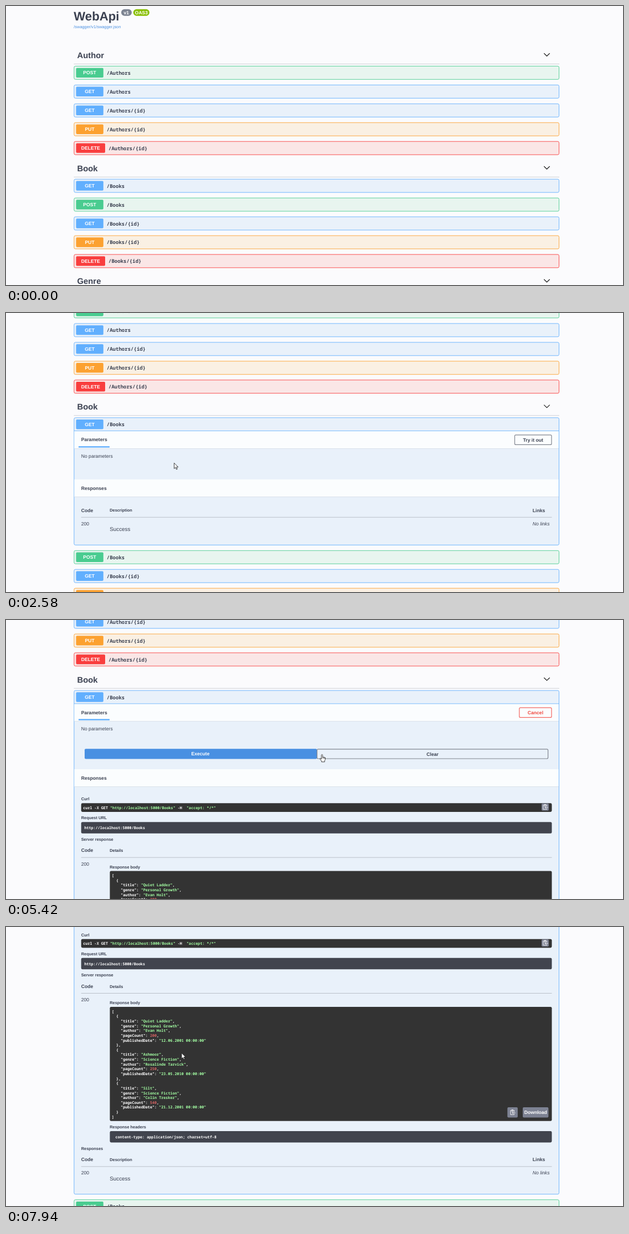
Animation of 1114 by 503 pixels, one loop 8 s. Source, as an HTML page:

```html
<!DOCTYPE html>
<html lang="en">
<head>
<meta charset="utf-8">
<title>WebApi</title>
<style>
  html, body { margin: 0; width: 100%; height: 100%; overflow: hidden; background: #fbfbfd; }
  svg { display: block; }
  text {
    font-family: "Liberation Sans", Arial, sans-serif;
    font-weight: 700; fill: #3b4151; white-space: pre; text-rendering: geometricPrecision;
  }
  .mono { font-family: "Noto Sans Mono", "DejaVu Sans Mono", monospace; }
  .plain { font-weight: 400; }
  .italic { font-weight: 400; font-style: italic; }
  .mid { text-anchor: middle; }
  .white { fill: #fff; }
  .str { fill: #a2fca2; }
  .num { fill: #d36363; }
</style>
</head>
<body>
<svg id="stage" width="1114" height="503" viewBox="0 0 1114 503"></svg>
<script>
const LOOP = 8000, PITCH = 33.95, ROW_H = 24.7, SECTION_H = 203.75, TICK = 61.7;
const LEFT = 122.9, RIGHT = 998.5, INNER = 135.7, INNER_R = 985.5;
const PANEL_Y = 3 * TICK;            // the panel is laid out as seen after three scroll ticks
const PANEL_TOP = 126.7;
const PANEL_BOTTOM = [PANEL_TOP + ROW_H, 357, 379.2, 790.6];
const TINTS = {
  POST: ['#49cc90', '#e8f5ef'], GET: ['#61affe', '#e9f1fa'],
  PUT: ['#fca130', '#faf0e3'], DELETE: ['#f93e3e', '#fae6e6']
};
const SECTIONS = [
  ['Author', ['POST', 'GET', 'GET', 'PUT', 'DELETE']],
  ['Book', ['GET', 'POST', 'GET', 'PUT', 'DELETE']],
  ['Genre', ['GET', 'POST', 'GET', 'PUT', 'DELETE']]
];
const BOOKS = [
  ['Quiet Ladder', 'Personal Growth', 'Evan Holt', 200, '12.06.2001'],
  ['Ashmoor', 'Science Fiction', 'Rosalinde Tarvick', 250, '23.05.2010'],
  ['Silt', 'Science Fiction', 'Colin Tresker', 540, '21.12.2001']
];

const rect = (x, y, x2, y2, fill, extra = '') =>
  `<rect x="${x}" y="${y}" width="${x2 - x}" height="${y2 - y}" fill="${fill}" ${extra}/>`;
const text = (x, cy, str, size = 8.64, cls = '') =>
  `<text x="${x}" y="${cy + size * .358}" font-size="${size}" class="${cls}">${str}</text>`;
const mono = (x, cy, str) => text(x, cy, str, 6.78, 'mono white');
const small = (x, cy, str) => text(x, cy, str, 7.4);
const rule = (y, x, x2, color = '#aeb4bd') => rect(x, y - .4, x2, y + .4, color);
const tag = (cls, str) => `<tspan class="${cls}">${str}</tspan>`;
const group = (id, body, y = 0) => `<g id="${id}" transform="translate(0 ${y})">${body}</g>`;

function summary(method, path, top) {
  const wide = method === 'DELETE' ? 3.2 : 0, cy = top + ROW_H / 2;
  return rect(126.5, cy - 8.7, 175.8 + wide, cy + 8.7, TINTS[method][0], 'rx="1.8"') +
    text(151.1 + wide / 2, cy, method, 8.64, 'mid white') +
    text(181.8 + wide, cy + .3, path, 9.03, 'mono');
}

function block(method, top, bottom) {
  const [line, fill] = TINTS[method];
  return rect(LEFT, top + .4, RIGHT, bottom - .4, fill, `rx="2.4" stroke="${line}" stroke-width=".9"`);
}

function heading(name, y) {
  return text(128.6, y + 88.6, name, 14.8) + rule(y + 104.5, 122.5, 999, '#c4c6cc') +
    `<path d="M971.3 ${y + 85.3}l5.2 5 5.2-5" fill="none" stroke="#222" stroke-width="1.2"/>`;
}

function section(index, from = 0) {
  const [name, methods] = SECTIONS[index], y = index * SECTION_H;
  const rows = methods.map((method, i) => {
    const top = y + 108 + i * PITCH;
    const path = `/${name}s` + (i > 1 ? '/{id}' : '');
    return i < from ? '' : block(method, top, top + ROW_H) + summary(method, path, top);
  });
  return (from ? '' : heading(name, y)) + rows.join('');
}

function band(top, label) {
  return rect(123.4, top, 998, top + 31.3, '#fbfdfe') + rule(top + 31.5, 123.4, 998, '#d5dde6') +
    text(INNER, top + 15.5, label);
}

// Table of documented responses; y is the centre of its heading line
function responseTable(y) {
  return text(INNER, y, 'Code') + small(187.2, y, 'Description') + text(950.8, y, 'Links') +
    rule(y + 12.7, INNER, INNER_R) + text(INNER, y + 24.2, '200', 8.64, 'plain') +
    text(950.8, y + 24.2, 'No links', 8.64, 'italic') + text(187.2, y + 34.4, 'Success', 9.87, 'plain');
}

function copyButton(x, y, size) {
  const c = size / 2;
  return rect(x, y, x + size, y + size, '#7d8293', 'rx="2"') +
    `<g transform="translate(${x + c} ${y + c})" fill="none" stroke="#fff" stroke-width=".9">` +
    '<path d="M3-1V-3.6H-3.6V4H3V2.6M5 .8H-.5M1.2-1-.6.8 1.2 2.6M-2-1.7H1.3"/><path d="M-1.8-4.2H1.2" stroke-width="1.6"/></g>';
}

function jsonLines() {
  const lines = ['['];
  BOOKS.forEach(([title, genre, author, pages, date], i) => lines.push(
    '  {', `    "title": "${title}",`, `    "genre": "${genre}",`, `    "author": "${author}",`,
    `    "pageCount": ${pages},`, `    "publishedDate": "${date} 00:00:00"`,
    i < BOOKS.length - 1 ? '  },' : '  }'));
  return lines.concat(']').map(line => line
    .replace(/: (".*")/, (_, s) => ': ' + tag('str', s))
    .replace(/: (\d+)/, (_, n) => ': ' + tag('num', n)));
}

function result() {
  const url = 'http://localhost:5000/Books';
  const curl = `curl -X GET ${tag('str', `"${url}"`)} -H  ${tag('str', '"accept: */*"')}`;
  const dark = (x, y, y2, fill) => rect(x, y, INNER_R, y2, fill, 'rx="2.4"');
  return band(269, 'Responses') +
    small(INNER, 322.5, 'Curl') + dark(INNER, 330.3, 346, '#333') + mono(139.3, 338.4, curl) +
    copyButton(967, 330.8, 13) +
    small(INNER, 356.5, 'Request URL') + dark(INNER, 364.2, 384.8, '#41444e') + mono(141.4, 374.8, url) +
    small(INNER, 395.3, 'Server response') +
    text(INNER, 415.4, 'Code') + small(187.2, 415.4, 'Details') + rule(428.1, INNER, INNER_R) +
    text(INNER, 439.6, '200', 8.64, 'plain') + small(187.2, 444.9, 'Response body') +
    dark(187.5, 452.4, 658.3, '#333') +
    jsonLines().map((line, i) => mono(190.9, 460.8 + i * 8.636, line)).join('') +
    copyButton(905.3, 633.5, 18.6) + rect(933, 633.5, 979.4, 652, '#7d8293', 'rx="2"') +
    text(956.3, 642.3, 'Download', 8.64, 'mid white') +
    small(187.2, 668.7, 'Response headers') + dark(187.5, 676.5, 697, '#41444e') +
    mono(197.4, 687, 'content-type: application/json; charset=utf-8') +
    small(INNER, 707.6, 'Responses') + responseTable(727.7);
}

function button(x, y, x2, y2, label, line, ink) {
  return rect(x, y, x2, y2, 'none', `rx="2" stroke="${line}" stroke-width="1.2"`) +
    `<g style="--ink:${ink}">` +
    text((x + x2) / 2, (y + y2) / 2, label, 8.64, 'mid').replace('<text', `<text style="fill:${ink}"`) + '</g>';
}

function panel(state) {
  const blue = TINTS.GET[0];
  let out = block('GET', PANEL_TOP, PANEL_BOTTOM[state]) + summary('GET', '/Books', PANEL_TOP);
  if (!state) return out;
  out += band(151.2, 'Parameters') + rule(150.9, LEFT, RIGHT, blue) +
    rect(131, 178.5, 187, 180.9, blue) + text(INNER, 196.4, 'No parameters', 8.64, 'plain');
  out += state === 1
    ? button(918.5, 158.1, 985, 175.7, 'Try it out', '#80858f', '#3b4151')
    : button(926.8, 158.1, 985, 175.7, 'Cancel', '#f4655f', '#f0483f');
  if (state === 2) {
    out += rect(INNER, 226, INNER_R, 248, '#4990e2', 'rx="2"') + text(560.5, 237, 'Execute', 8.64, 'mid white');
  }
  if (state === 3) {
    return out + rect(142, 232.3, 561.3, 250.6, '#4990e2', 'rx="2"') +
      text(351, 241.4, 'Execute', 8.64, 'mid white') +
      button(561.6, 232.9, 978.6, 250, 'Clear', '#80858f', '#3b4151') + result();
  }
  const shift = state === 2 ? 22.4 : 0;
  return out + band(238.4 + shift, 'Responses') + responseTable(293.8 + shift);
}

const title = text(122.3, 18.2, 'WebApi', 22.2) +
  rect(208, 5.8, 227, 17.8, '#7d8492', 'rx="6"') + text(217.3, 11.9, 'v1', 8.5, 'mid white') +
  rect(229.8, 5.8, 259, 17.8, '#89bf04', 'rx="6"') + text(244.4, 11.9, 'OAS3', 8.5, 'mid white') +
  text(122.3, 37.6, '/swagger/v1/swagger.json', 7.4, 'plain').replace('<text', '<text style="fill:#4990e2"');

const stage = document.getElementById('stage');
const cursorStyle = 'fill="#fff" stroke="#111" stroke-width=".8" stroke-linejoin="round"';
stage.innerHTML = group('page',
  title + section(0) + heading('Book', SECTION_H) +
  [0, 1, 2, 3].map(s => group('panel' + s, panel(s), PANEL_Y)).join('') +
  group('rest', section(1, 1) + section(2))) +
  `<g id="cursor" ${cursorStyle}>` +
  '<path id="arrow" d="M0 0V10.2L2.4 8 4 11.6 5.7 10.9 4.1 7.4H7.3Z"/>' +
  '<path id="hand" d="M-1.2 1Q0-.6 1.1 1V5.2L2 4.7 3 5.3 4 5 4.8 5.7 5.7 5.8V9.6L4.7 11.5V13.6H-.9V12L-3.9 8.3Q-3.6 6.6-2.3 7.6L-1.2 8.6ZM1.1 5.2V7.4M3 5.4V7.6M4.8 5.8V7.7"/></g>';

const SCROLL = [[0, 0], [1290, 1], [2510, 2], [4110, 3], [5480, 4], [5550, 5], [5820, 7], [5890, 8]];
const STATE = [[0, 0], [2110, 1], [3620, 2], [4660, 3]];
// start, end, steps, x, y, hand
const MOVES = [
  [260, 670, 7, 262, 290, 1], [870, 1150, 5, 243, 288, 1], [1620, 1900, 5, 203, 277.5, 0],
  [1970, 2040, 2, 200, 262, 1], [2510, 2790, 5, 459, 283, 0], [2990, 3340, 6, 911, 224.3, 0],
  [3410, 3480, 2, 938, 228, 1], [3620, 3970, 6, 578, 212.5, 1], [4310, 4520, 4, 570.6, 242.2, 1],
  [6090, 6430, 6, 440, 268, 0], [6490, 6690, 4, 286, 215, 0], [6760, 6870, 2, 305, 170.5, 0],
  [7330, 7530, 4, 305, 220, 0], [7800, 7940, 3, 317, 227.2, 0]
];
const current = (table, t) => table.filter(([at]) => at <= t).pop()[1];

function cursorAt(t) {
  let x = 330, y = 478, hand = 0;
  for (const [start, end, steps, toX, toY, toHand] of MOVES) {
    if (t < start) break;
    const done = Math.min(1, (Math.floor((t - start) / (end - start) * (steps - 1) + 1e-6) + 1) / steps);
    x += (toX - x) * done;
    y += (toY - y) * done;
    if (done === 1 || !toHand) hand = toHand;
  }
  return { x, y, hand };
}

const el = id => document.getElementById(id);
const show = (id, on) => { el(id).style.display = on ? '' : 'none'; };
const move = (id, x, y) => el(id).setAttribute('transform', `translate(${x} ${y})`);

function draw() {
  const t = performance.now() % LOOP, state = current(STATE, t), { x, y, hand } = cursorAt(t);
  move('page', 0, -TICK * current(SCROLL, t));
  move('rest', 0, PANEL_BOTTOM[state] - PANEL_BOTTOM[0]);
  for (let s = 0; s < 4; s++) show('panel' + s, s === state);
  move('cursor', x, y);
  show('cursor', t >= MOVES[0][0]);
  show('arrow', !hand);
  show('hand', hand);
  requestAnimationFrame(draw);
}
draw();
</script>
</body>
</html>
```
